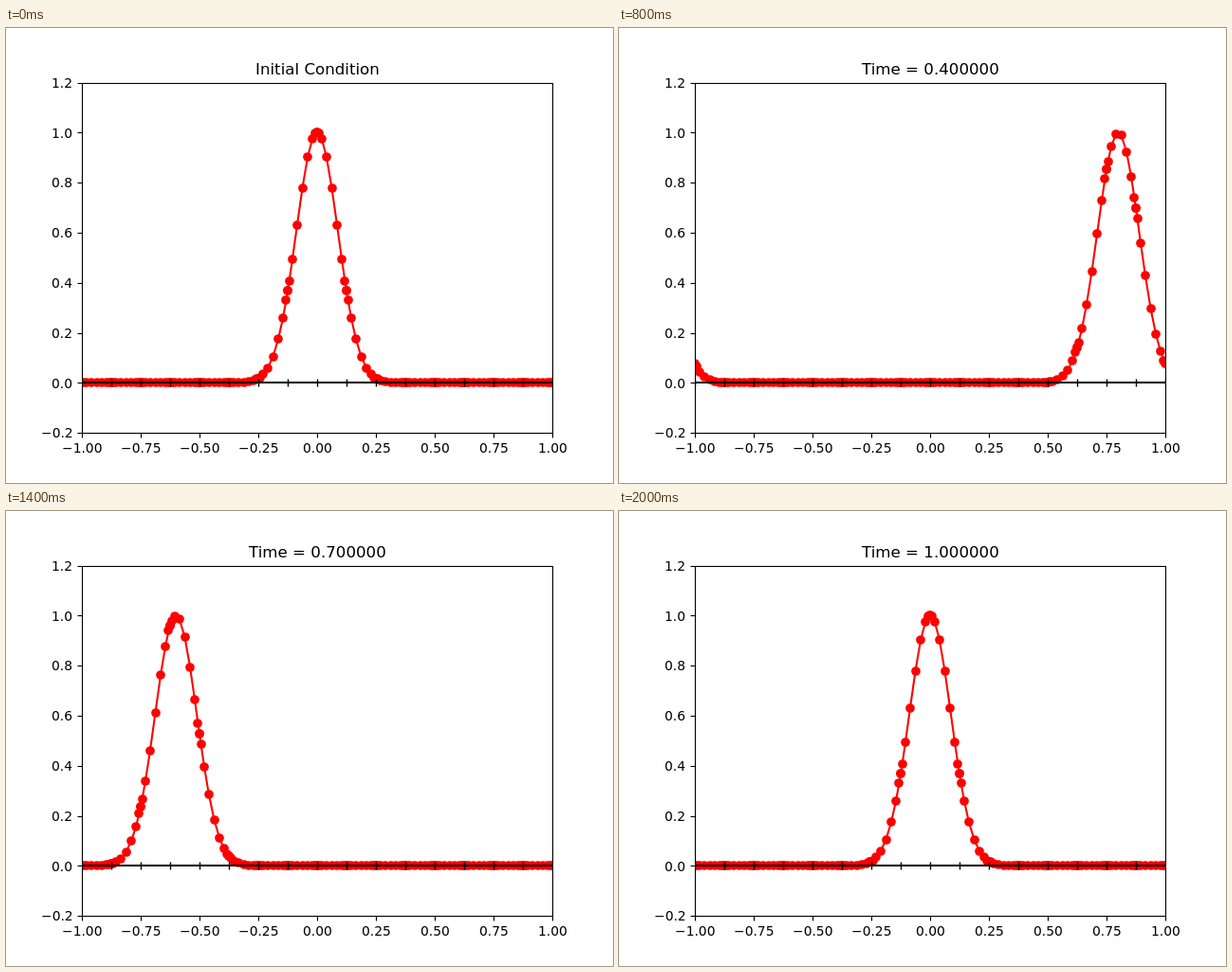
Write an HTML page with a canvas that moves like this. It is 640x480 px and loops after 2200 ms.

```html
<!DOCTYPE html>
<html>
<head>
<meta charset="utf-8">
<style>
html, body { margin: 0; width: 100%; height: 100%; overflow: hidden; background: #fff; }
canvas { display: block; }
</style>
</head>
<body>
<canvas id="stage" width="640" height="480"></canvas>
<script>
const ctx = document.getElementById('stage').getContext('2d');
const STEP_MS = 200, STEPS = 11, SPEED = 2, ELEMENTS = 16;
const PT = 100 / 72; // points to pixels
const LEFT = 80, RIGHT = 576, TOP = 57.6, BOTTOM = 427.2;

const px = x => LEFT + (x + 1) / 2 * (RIGHT - LEFT);
const py = y => BOTTOM - (y + 0.2) / 1.4 * (BOTTOM - TOP);
const snap = v => Math.floor(v + 0.5);

// Gauss-Lobatto points of degree 8, repeated in each element
const half = [1, 0.8997579954, 0.6771862795, 0.3631174638];
const lobatto = [...half.map(v => -v), 0, ...half.slice().reverse()];
const width = 2 / ELEMENTS;
const nodes = [];
for (let e = 0; e < ELEMENTS; e++)
  for (const r of lobatto) nodes.push(-1 + width * (e + (r + 1) / 2));

// Gaussian pulse on a periodic domain of length 2
function pulse(x, centre) {
  let d = x - centre;
  d -= 2 * Math.round(d / 2);
  return Math.exp(-64 * d * d);
}

function line(x1, y1, x2, y2, points) {
  ctx.lineWidth = points * PT;
  ctx.beginPath();
  ctx.moveTo(x1, y1);
  ctx.lineTo(x2, y2);
  ctx.stroke();
}

// align: 0.5 centres the text on x, 1 ends it there
function text(str, x, y, points, align) {
  ctx.font = `${points * PT}px "DejaVu Sans", sans-serif`;
  ctx.fillText(str, Math.round(x - ctx.measureText(str).width * align), y);
}

const label = (v, digits) => v.toFixed(digits).replace('-', '\u2212');

function drawCurve(centre) {
  const points = nodes.map(x => [px(x), py(pulse(x, centre))]);
  ctx.strokeStyle = ctx.fillStyle = '#f00';
  ctx.lineWidth = 1.5 * PT;
  ctx.lineJoin = 'round';
  ctx.beginPath();
  for (const [x, y] of points) ctx.lineTo(x, y);
  ctx.stroke();
  for (const [x, y] of points) {
    ctx.beginPath();
    ctx.arc(snap(x), snap(y), 3.5 * PT, 0, 2 * Math.PI);
    ctx.fill();
  }
}

function drawMesh() {
  const y = snap(py(0));
  line(LEFT, y, RIGHT, y, 1.5);
  for (let e = 0; e <= ELEMENTS; e++) {
    const x = snap(px(-1 + e * width)) + 0.5;
    line(x, y - 3.5, x, y + 4.5, 1);
  }
}

function drawAxes() {
  ctx.lineWidth = 0.8 * PT;
  ctx.lineJoin = 'miter';
  const top = snap(TOP) + 0.5, bottom = snap(BOTTOM) + 0.5;
  ctx.strokeRect(LEFT + 0.5, top, RIGHT - LEFT, bottom - top);
  for (let i = 0; i <= 8; i++) {
    const v = -1 + i / 4, x = snap(px(v)) + 0.5;
    line(x, bottom, x, bottom + 5, 0.8);
    text(label(v, 2), px(v), 448, 10, 0.5);
  }
  for (let i = 0; i <= 7; i++) {
    const v = (i - 1) / 5, y = snap(py(v)) + 0.5;
    line(LEFT - 4.5, y, LEFT + 0.5, y, 0.8);
    text(label(v, 1), 70.3, Math.round(py(v) + 5.2), 10, 1);
  }
}

function draw(step) {
  const time = step / 10;
  ctx.fillStyle = '#fff';
  ctx.fillRect(0, 0, 640, 480);

  ctx.save();
  ctx.beginPath();
  ctx.rect(LEFT, snap(TOP), RIGHT - LEFT, snap(BOTTOM) - snap(TOP));
  ctx.clip();
  drawCurve(SPEED * time);
  ctx.strokeStyle = '#000';
  drawMesh();
  ctx.restore();

  ctx.strokeStyle = ctx.fillStyle = '#000';
  drawAxes();
  text(step ? `Time = ${time.toFixed(6)}` : 'Initial Condition', 328, 49, 12, 0.5);
}

const start = performance.now();
function tick() {
  draw(Math.floor((performance.now() - start) / STEP_MS) % STEPS);
  requestAnimationFrame(tick);
}
tick();
</script>
</body>
</html>
```
